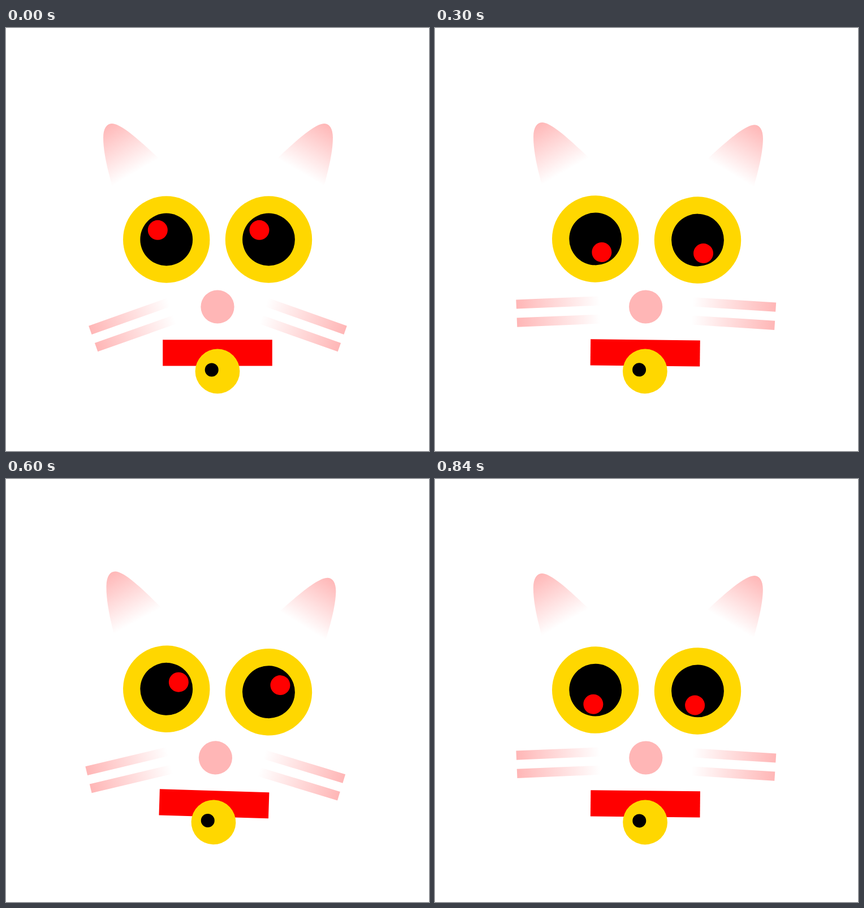
Write an HTML page that moves like this. It is 748 px wide and 748 px high and loops after 0.87 s.

```html
<!DOCTYPE html>
<html lang="en">
<head>
<meta charset="utf-8">
<title>Cat</title>
<style>
  html, body { margin: 0; width: 100%; height: 100%; overflow: hidden; background: #fff; }
  svg { display: block; width: 100vw; height: 100vh; }
  .gold { fill: #ffd700; }
  .red { fill: #f00; }
  .pink { fill: #ffb6b6; }
</style>
</head>
<body>
<svg viewBox="0 0 748 748">
  <defs>
    <linearGradient id="earFade" gradientUnits="userSpaceOnUse" x1="181" y1="169" x2="231" y2="254">
      <stop offset="0" stop-color="#ffb6b6"/>
      <stop offset="1" stop-color="#ffb6b6" stop-opacity="0"/>
    </linearGradient>
    <linearGradient id="hairFade" gradientUnits="userSpaceOnUse" x1="-150.4" y1="0" x2="-3" y2="0">
      <stop offset="0" stop-color="#ffb6b6"/>
      <stop offset="1" stop-color="#ffb6b6" stop-opacity="0"/>
    </linearGradient>
    <path id="ear" fill="url(#earFade)" d="M190 288C183 262 172 224 172 194C172 178 178 169 187 169C204 169 238 200 276 236Z"/>
    <path id="hairs" fill="url(#hairFade)" d="M-150.4 -24.2H0V-8H-150.4ZM-150.4 8H0V24.2H-150.4Z"/>
    <g id="eye">
      <circle class="gold" r="76.7"/>
      <circle r="46.4"/>
    </g>
  </defs>
  <g id="head">
    <use href="#ear"/>
    <use href="#ear" transform="translate(750) scale(-1 1)"/>
    <use href="#eye" x="283.7" y="374"/>
    <use href="#eye" x="464.5" y="374"/>
    <circle class="glint red" r="17.5"/>
    <circle class="glint red" r="17.5"/>
    <circle class="pink" cx="374" cy="493" r="29.6"/>
    <g transform="translate(296 499.3)"><use class="whisker" href="#hairs"/></g>
    <g transform="translate(453 499.3) scale(-1 1)"><use class="whisker" href="#hairs"/></g>
    <rect class="red" x="277.2" y="551.3" width="193.6" height="46.2"/>
    <circle class="gold" cx="374" cy="607" r="39.4"/>
    <circle cx="363.7" cy="604.5" r="12"/>
  </g>
</svg>
<script>
  const LOOP = 870, TICK = 30;
  const head = document.getElementById('head');
  const glints = document.querySelectorAll('.glint');
  const whiskers = document.querySelectorAll('.whisker');
  const orbitX = [284.9, 464.6], orbitY = 375.2, orbitR = 24.4;

  const easeInOut = x => {
    const a = x ** 1.75, b = (1 - x) ** 1.75;
    return a / (a + b);
  };

  // Slow tilt that snaps back and starts again
  const tilt = n => 2 * (Math.max(0, n - 4) / 18.5 % 1);

  // Rest low, swing up, swing back
  function lift(n) {
    const phase = Math.max(0, n - 4) % 18;
    const x = (phase - 2.2) / 7.87;
    const up = Math.max(0, 1 - Math.abs(x - 1));
    return 19.5 - 35.1 * easeInOut(up);
  }

  function draw(n) {
    head.setAttribute('transform', `rotate(${tilt(n)} 374 374)`);
    const angle = (227.2 + 62 * (n - 1)) * Math.PI / 180;
    glints.forEach((g, i) => {
      g.setAttribute('cx', orbitX[i] + orbitR * Math.cos(angle));
      g.setAttribute('cy', orbitY + orbitR * Math.sin(angle));
    });
    whiskers.forEach(w => w.setAttribute('transform', `rotate(${-lift(n)})`));
  }

  const start = performance.now();
  function play() {
    const t = (performance.now() - start) % LOOP;
    draw(Math.max(1, Math.floor(t / TICK)));
    requestAnimationFrame(play);
  }
  play();
</script>
</body>
</html>
```
